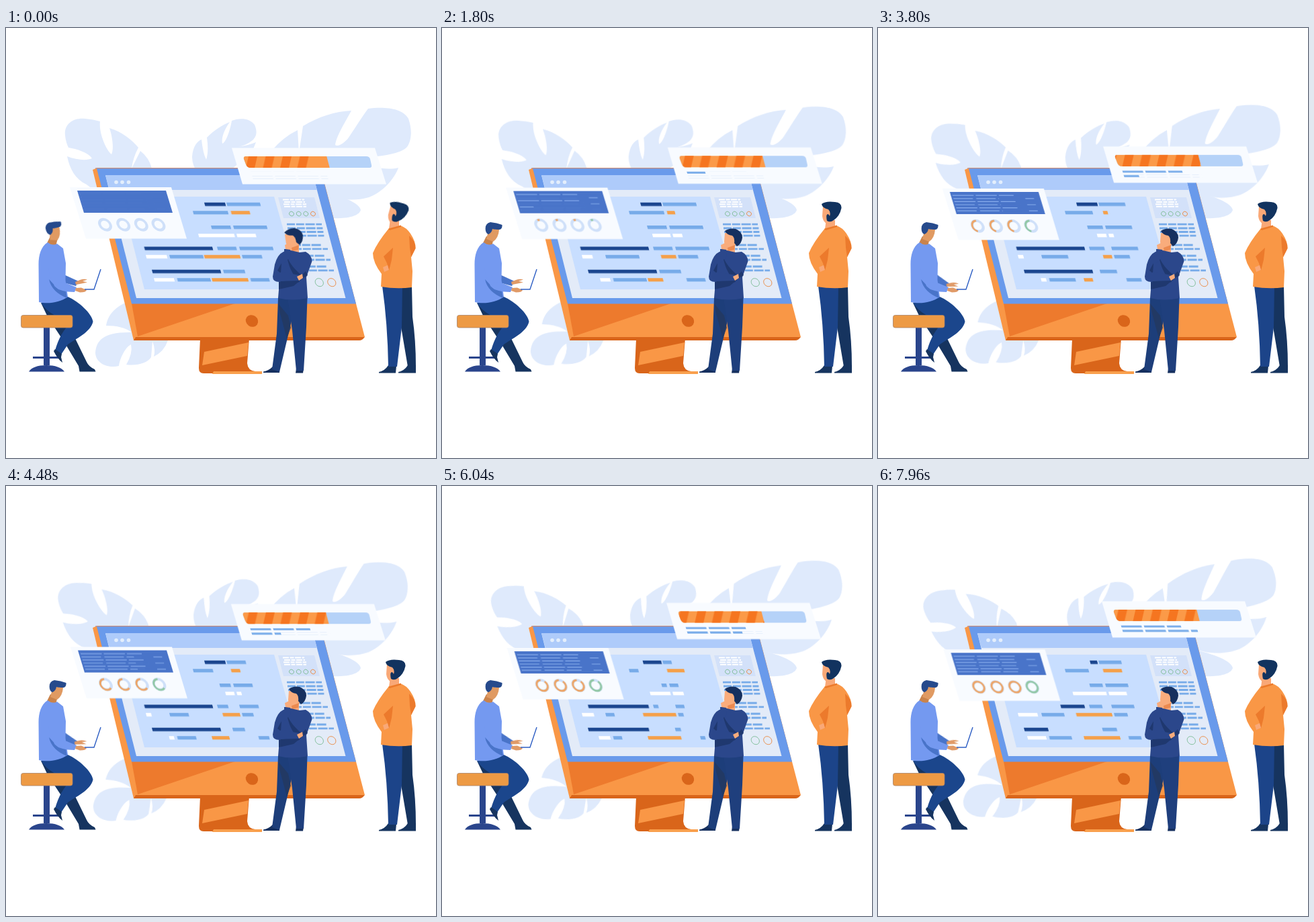
Animation, 640 px wide and 640 px high, one loop 8000 ms. Source, as an HTML page without scripts:

```html
<!DOCTYPE html>
<html lang="en">
<head>
<meta charset="utf-8">
<title>Team at the screen</title>
<style>
html, body { margin: 0; width: 100%; height: 100%; overflow: hidden; background: #fff; }
svg { display: block; width: 100vw; height: 100vh; }
.leaf { fill: #dfeafc; animation: turn 8s cubic-bezier(.4,.25,.75,.68) infinite; }
@keyframes turn { to { transform: rotate(var(--a)); } }
.pop { animation: drift 8s cubic-bezier(.42,.1,.8,.7) infinite; }
@keyframes drift { to { transform: translate(var(--x), var(--y)); } }

/* code bars */
.code rect { height: 5.2px; transform-box: fill-box; transform-origin: 0 0; animation: 8s linear infinite; }
.code .r { transform-origin: 100% 0; }
.code .b { fill: #77abe9; animation-name: blue; }
.code .o { fill: #f5a04a; animation-name: orange; }
.code .w { fill: #fff; animation-name: white; }
.code .d { fill: #1b468f; animation-name: dark; }
@keyframes blue {
  0%, 36% { transform: none; }
  47.5% { transform: scaleX(.79); }
  64.5% { transform: scaleX(.35); }
  79% { transform: scaleX(.24); }
  85.5% { transform: scaleX(.27); }
  100% { transform: scaleX(.69); }
}
@keyframes orange {
  0%, 80%, 100% { transform: none; }
  22.5% { transform: scaleX(.42); }
  33.5% { transform: scaleX(.29); }
  41%, 47.5% { transform: scaleX(.25); }
  64.5% { transform: scaleX(.72); }
}
@keyframes white {
  0% { transform: none; }
  22.5% { transform: scaleX(.5); }
  33.5% { transform: scaleX(.33); }
  47.5% { transform: scaleX(.26); }
  56% { transform: scaleX(.25); }
  64.5% { transform: scaleX(.32); }
  85.5% { transform: scaleX(.79); }
  100% { transform: scaleX(.94); }
}
@keyframes dark {
  0%, 70% { transform: none; }
  85.5% { transform: scaleX(.68); }
  100% { transform: scaleX(.34); }
}

/* covers shrink to the right and reveal the lines below them */
.hide rect { transform-box: fill-box; transform-origin: 100% 0; animation: 8s linear infinite; }
.hide .e0 { animation-name: e0; }
.hide .e1 { animation-name: e1; }
.hide .e2 { animation-name: e2; }
.hide .odd { animation-name: odd; }
.hide .s0 { animation-name: s0; }
.hide .s1 { animation-name: s1; }
.hide .s2 { animation-name: s2; }
@keyframes e0 { 0% { transform: none; } 9%, 100% { transform: scaleX(0); } }
@keyframes e1 { 0%, 9% { transform: none; } 18%, 100% { transform: scaleX(0); } }
@keyframes e2 { 0%, 18.5% { transform: none; } 22.5% { transform: scaleX(.79); } 32%, 100% { transform: scaleX(0); } }
@keyframes odd { 0%, 28% { transform: none; } 33.5% { transform: scaleX(.67); } 47.5% { transform: scaleX(.3); } 72%, 100% { transform: scaleX(0); } }
@keyframes s0 { 0%, 5% { transform: none; } 12%, 100% { transform: scaleX(0); } }
@keyframes s1 { 0%, 14% { transform: none; } 21%, 100% { transform: scaleX(0); } }
@keyframes s2 { 0%, 29% { transform: none; } 39%, 100% { transform: scaleX(0); } }
.hide .t0 { animation-name: t0; }
.hide .t1 { animation-name: t1; }
@keyframes t0 {
  0%, 14% { transform: none; }
  22.5% { transform: scaleX(.69); }
  33.5% { transform: scaleX(.3); }
  40%, 100% { transform: scaleX(0); }
}
@keyframes t1 {
  0%, 40% { transform: none; }
  47.5% { transform: scaleX(.8); }
  64.5% { transform: scaleX(.44); }
  85.5% { transform: scaleX(.155); }
  100% { transform: scaleX(.03); }
}

.ring { fill: none; stroke: #cfe0f9; stroke-width: 4; }
.arc { fill: none; stroke: #eda567; stroke-width: 2.8; stroke-dasharray: 100 200; animation: fill 8s linear infinite; }
.green { stroke: #92c8a5; }
@keyframes fill {
  0%, 16% { stroke-dashoffset: 100; }
  22.5% { stroke-dashoffset: 93; }
  33.5% { stroke-dashoffset: 77; }
  47.5% { stroke-dashoffset: 54; }
  64.5% { stroke-dashoffset: 19; }
  85.5% { stroke-dashoffset: 5; }
  100% { stroke-dashoffset: 0; }
}
.stripes { animation: slide 8s linear infinite; }
@keyframes slide { to { transform: translateX(230.5px); } }

.nod { animation: nod 8s infinite; }
@keyframes nod {
  0% { transform: rotate(var(--a)); animation-timing-function: ease-in-out; }
  20%, 100% { transform: none; }
}
.type { animation: type 8s ease-in-out infinite; transform-origin: 88px 373px; }
@keyframes type {
  0%, 22% { transform: none; }
  33.5% { transform: rotate(7deg); }
  47.5% { transform: rotate(11deg); }
  64.5%, 100% { transform: rotate(9deg); }
}
</style>
</head>
<body>
<svg viewBox="0 0 640 640">
<defs>
  <path id="o" pathLength="100" d="M0-8A8 8 0 0 0 0 8A8 8 0 0 0 0-8"/>
  <ellipse id="dot" cx="425" cy="276.500" rx="3.600" ry="3.200" transform="rotate(35 425 276.500)"/>
  <clipPath id="track"><path d="M357 191H536q5 0 6 4l2 9q1 4-3 4H364q-5 0-7-5l-3-8q-1-4 3-4z"/></clipPath>
  <clipPath id="done"><path d="M340 190H477L482 209H340z"/></clipPath>
</defs>

<!-- leaves -->
<path class="leaf" style="--a:-14deg;transform-origin:190px 251px" d="M88 160C86 143 100 133 118 135Q130 136 140 139C138 155 148 180 157 188C161 180 158 160 154 149C172 154 188 167 197 178Q189 193 187 209L200 183Q213 193 217 209L215 245L150 256L120 233C103 225 95 210 91 191C104 196 120 198 128 194C122 185 105 180 93 178Q89 170 88 160z"/>
<path class="leaf" style="--a:6.3deg;transform-origin:285px 232px" d="M277 192C278 176 285 168 291 166Q293 186 298 196Q302 184 299 163C310 152 322 144 333 140C326 150 320 162 322 172C328 170 334 150 336 138C346 134 362 133 370 144C375 156 372 162 367 167Q357 175 345 177Q360 175 372 170L366 185L330 215H285Q277 204 277 192z"/>
<path class="leaf" style="--a:-5deg;transform-origin:431px 270px" d="M396 182Q413 162 434 152L436 186L442 146C465 132 490 124 514 123C505 140 492 160 490 174C494 178 505 170 510 163C522 145 530 132 539 120C560 117 590 118 599 135C606 155 602 170 597 177C588 187 560 191 530 193L523 197C545 208 567 212 584 208C578 225 560 245 540 252C520 258 498 256 480 249L430 250z"/>
<path fill="#dfeafc" d="M468 243C500 250 526 260 528 271C525 281 505 284 484 283z"/>
<path class="leaf" style="--a:7.5deg;transform-origin:245px 430px" d="M149 443C152 425 165 414 180 408L250 425L241 465Q235 482 220 489Q223 480 218 466Q217 478 216 490C210 499 195 503 179 501Q189 484 186 471C178 475 170 490 168 503C153 507 134 500 133 484C134 465 145 452 187 453C178 446 165 443 149 443z"/>

<!-- stand -->
<path fill="#d9651a" d="M289 462H362L359 499Q360 510 371 511H381V514H294Q287 514 287 506z"/>
<path fill="#f99746" d="M295 482L361 468L359 488L292 502z"/>
<path fill="#f9a04d" d="M309 511H381V515H307z"/>

<!-- monitor -->
<path fill="#f99746" d="M129 211L136 208H468L534 460L190 465z"/>
<path fill="#d9651a" d="M193 460H534L533 461Q530 465 526 465H190z"/>
<path fill="#ed7a2d" d="M187 410H341L196 459z"/>
<path fill="#699aeb" d="M135 209H468L521 410.500H187z"/>
<path fill="#b98a8c" d="M133 208.200H468V209.200H133z"/>
<ellipse cx="366" cy="436" rx="9.500" ry="8.500" fill="#d9651a" transform="rotate(35 366 436)"/>
<path fill="#e3ebf8" d="M148 219H457L505.500 402H194z"/>
<path fill="#aecbfa" d="M148 219H457L462.800 241H154z"/>
<g fill="#e3eefc"><circle cx="164" cy="229.500" r="2.800"/><circle cx="173" cy="229.500" r="2.800"/><circle cx="182.500" cy="229.500" r="2.800"/></g>
<path fill="#c8deff" d="M171 251H399L438 389H206z"/>

<!-- side column -->
<path fill="#d3e1f9" d="M405 252H459L467 283H413z"/>
<g fill="none" stroke="#fff" stroke-width="2" stroke-dasharray="9 1.500 6 1.500">
  <path d="M412 255.500h32M414 259h31M413 262.300h34M414 265.700h33"/>
</g>
<g fill="none" stroke="#77abe9" stroke-width="2.800" stroke-dasharray="12 1.800 12 1.800 14 1.800 9 2">
  <path d="M418 292.200h52M419 298h53M420 303.500h54M421 309.200h54M427 323h42M428 328.800h51M432 339h42M433 345h50M435 355h43M437 360.800h51"/>
</g>
<g fill="none" stroke="#84bf9c" stroke-width=".9">
  <use href="#dot"/><use href="#dot" x="10.700"/><use href="#dot" x="21.300"/><use href="#dot" x="32" stroke="#ea8f4c"/>
  <ellipse cx="466.300" cy="378.700" rx="6.600" ry="5.500" transform="rotate(42 466.300 378.700)"/>
  <ellipse cx="484.800" cy="378.700" rx="6.600" ry="5.500" stroke="#ea8f4c" transform="rotate(42 484.800 378.700)"/>
</g>

<!-- code rows -->
<g class="code">
  <g transform="translate(0 259.800) skewX(14.500)"><rect class="d r" x="295" width="31"/><rect class="b" x="328" width="50"/></g>
  <g transform="translate(0 272.200) skewX(14.500)"><rect class="b" x="278" width="52"/><rect class="o" x="334.500" width="28"/></g>
  <g transform="translate(0 294) skewX(14.500)"><rect class="b r" x="305" width="29"/><rect class="b" x="338" width="50"/></g>
  <g transform="translate(0 306.200) skewX(14.500)"><rect class="w r" x="286" width="53.500"/><rect class="w" x="343" width="28.500"/></g>
  <g transform="translate(0 325.500) skewX(14.500)"><rect class="d r" x="205.500" width="101.500"/><rect class="b" x="314" width="28.500"/><rect class="b" x="347" width="50"/></g>
  <g transform="translate(0 337.800) skewX(14.500)"><rect class="w" x="208" width="31"/><rect class="b" x="243" width="50"/><rect class="o r" x="294.500" width="53.500"/><rect class="b" x="351" width="29.500"/></g>
  <g transform="translate(0 359.800) skewX(14.500)"><rect class="d" x="217" width="102"/><rect class="b r" x="323" width="32"/></g>
  <g transform="translate(0 372.200) skewX(14.500)"><rect class="w r" x="220" width="30"/><rect class="b" x="254.500" width="49.500"/><rect class="o" x="306" width="54"/><rect class="b r" x="363.500" width="28"/></g>
</g>

<!-- chart panel -->
<g class="pop" style="--x:2.500px;--y:6.300px">
  <path fill="#f8fbff" d="M95 237H246L269 313.500H119z"/>
  <path fill="#4974c9" d="M106 242H238L248 275H116z"/>
  <g transform="translate(110 247.200) skewX(17)">
    <g fill="none" stroke="#86abec" stroke-width="1.200">
      <path stroke-dasharray="31.500 3 31.500 3 22 50" d="M0 0H95M0 9.200H95M0 18.400H95"/>
      <path stroke-dasharray="29 5 29 4 22 50" d="M0 4.600H95M0 13.800H89M0 23H95"/>
      <path d="M107 4.600h13M107 13.800h13M107 23h13"/>
    </g>
    <g class="hide" fill="#4974c9">
      <rect class="e0" y="-1.500" width="97" height="3"/>
      <rect class="e1" y="7.700" width="97" height="3"/>
      <rect class="e2" y="16.900" width="97" height="3"/>
      <rect class="odd" y="3.100" width="97" height="3"/>
      <rect class="odd" y="12.300" width="97" height="3"/>
      <rect class="odd" y="21.500" width="97" height="3"/>
      <rect class="s0" x="106" y="3.100" width="15" height="3"/>
      <rect class="s1" x="106" y="12.300" width="15" height="3"/>
      <rect class="s2" x="106" y="21.500" width="15" height="3"/>
    </g>
  </g>
  <g transform="translate(147.500 292.800) skewX(17)"><use href="#o" class="ring"/><use href="#o" class="arc"/></g>
  <g transform="translate(174.700 292.800) skewX(17)"><use href="#o" class="ring"/><use href="#o" class="arc"/></g>
  <g transform="translate(201.300 292.800) skewX(17)"><use href="#o" class="ring"/><use href="#o" class="arc"/></g>
  <g transform="translate(227 292.800) skewX(17)"><use href="#o" class="ring"/><use href="#o" class="arc green"/></g>
</g>

<!-- progress panel -->
<g class="pop" style="--x:-3px;--y:-7px">
  <path fill="#f8fbff" d="M336 178.500H549L566 232.500H352z"/>
  <g clip-path="url(#track)">
    <path fill="#b5d2f8" d="M350 190H550V209H350z"/>
    <g clip-path="url(#done)">
      <path fill="#fb9a48" d="M340 190H490V209H340z"/>
      <g class="stripes"><path fill="none" stroke="#f57520" stroke-width="19" stroke-dasharray="13 12.500" transform="translate(0 199.500) skewX(-13)" d="M448.500 0H90"/></g>
    </g>
  </g>
  <g transform="translate(365 216) skewX(17)">
    <path fill="none" stroke="#77abe9" stroke-width="3" stroke-dasharray="30.500 3.500" d="M0 0H89M0 6.500H112"/>
    <g class="hide" fill="#f8fbff"><rect class="t0" y="-2" x="-1" width="91" height="4"/><rect class="t1" y="4.500" x="-1" width="117" height="4"/></g>
  </g>
</g>

<!-- seated man -->
<path fill="#2a458c" d="M56 445H65V502H56zM40 489H80V492H40zM34 511.500Q40 502 60 502T87 511.500z"/>
<path fill="#16345f" d="M52 409L75 424L101 434L101 458L120 497Q123 504 132 508L133.500 511.500H109.500L108 503L87 468L62 430z"/>
<path fill="#1b468c" d="M56 408L92 400C108 407 128 425 129.500 437C126 453 103 463 92 471L82 486L73 480C78 462 86 448 97 438C80 432 62 425 52 409z"/>
<path fill="#16345f" d="M73 478L83 485L82 490L84 498Q77 493 71 481z"/>
<rect x="22.500" y="427.500" width="76.500" height="18.500" rx="3" fill="#ed9a44" stroke="#a98267" stroke-width=".8"/>
<g class="type">
  <path fill="#4974c9" d="M84 366L108 377L104 384L86 379z"/>
  <path fill="#e09a67" d="M103 378L110 375Q116 373 121 374.500L114 376.800L121 378.500L112 380.500L104 382z"/>
</g>
<path fill="#c9834c" d="M66 310L77 313L74 325L61 320z"/>
<path fill="#7499f0" d="M62 319C52 325 48.500 338 48.500 352L49 408C62 411 80 409 92 400L88.500 375L89 350L85 328L76 321Q69 325 62 319z"/>
<path fill="#4974c9" d="M64 374Q68 393 91 402L89 391L78 389z"/>
<path fill="#7499f0" d="M62 355L67 377L88 379L105 386L102 393Q80 393 72 384z"/>
<path fill="#e09a67" d="M104 387L112 386.500L120 390Q119 393.500 110 393.500L103 391z"/>
<path fill="none" stroke="#2f5fc4" stroke-width="1.400" d="M141 359L131 389H117"/>
<g class="nod" style="--a:-18deg;transform-origin:70px 316px">
  <path fill="#e09a62" d="M70 298L85 300Q84 313 76 318L66 314z"/>
  <path fill="#264a8c" d="M65 302Q63 291 72 289Q82 290 89.500 293Q90 299 86 300Q78 300 75 299Q74 305 69 307Q66 306 65 302z"/>
</g>

<!-- thinking man -->
<path fill="#16305f" d="M397 504L407 507V513H383V511.500Q391 510 397 504zM432 507H443L442 513.500H431z"/>
<path fill="#1d3e7a" d="M405 402H428L424 440L407 512L396 508L403 455z"/>
<path fill="#1f3f7d" d="M419 402H448.500L447 445L443 510H432L426 450z"/>
<path fill="#233960" d="M405 410L420 428L424 446L418 462L408 425z" opacity=".8"/>
<path fill="#f7aa7c" d="M423 320H436V337H423z"/>
<g class="nod" style="--a:-13deg;transform-origin:428px 333px">
  <path fill="#f9ac7c" d="M421 305L436 306L439 322L430 328Q420 328 420 318z"/>
  <path fill="#16305f" d="M421 302Q428 297 437 299Q447 303 447 312Q446 321 439 325L435 320Q436 312 432 309Q424 308 421 302z"/>
</g>
<path fill="#ec8a50" d="M425 327L436 323L435 330L426 332z"/>
<path fill="#2b478b" d="M413 333L424 331L437 334L446 333Q455 338 455.500 347L447 371L449 402Q426 407 405 402L407 378Q397 378 397 370L400 352Q404 337 413 333z"/>
<path fill="#1f386f" d="M417 332Q418 350 440 368L446 362L449 368L441 373L409 377L406 386L437 378Q420 362 417 332zM410 350L404 361L409 365z"/>
<path fill="#1f386f" d="M406 378L440 374L428 384L406 389z"/>
<path fill="#2b478b" d="M398 369Q398 376 404 377L435 376L437 368L410 363z"/>
<path fill="#2b478b" d="M414 329L423 329L424 340L414 350z"/>
<path fill="#f9ac7c" d="M415 323L421 320L425 325L423 330L416 329zM433 370L441 366L442 372L436 376z"/>

<!-- standing man -->
<path fill="#16345f" d="M569 502L581 503L580 513.500H555V512Q564 510 569 502zM598 502H610V513.500H584V512Q593 510 598 502z"/>
<path fill="#16345f" d="M586 384H604L605 430Q610 465 610 504H598L588 445z"/>
<path fill="#1c4489" d="M560 384H590L589 445L582 504H569Q568 440 560 384z"/>
<path fill="#f9a877" d="M572 284L585 286V297L570 299z"/>
<path fill="#f99746" d="M570 298L587 294Q596 297 602 306Q610 318 609.500 328L603 341L605 362L604 386Q582 389 558 385L559 366Q546 349 546 335Q552 320 570 298z"/>
<path fill="#ec7a2c" d="M600 309Q610 318 609.500 328L603 341L601 327zM576 327L562 340L567 350L570 361L574 345zM569 299L588 293.500V296L571 301z"/>
<path fill="#f9a877" d="M561 356L568 353L570 360L563 363z"/>
<g class="nod" style="--a:11deg;transform-origin:577px 294px">
  <path fill="#f9a877" d="M567 265L579 266L582 286L573 291Q567 289 566 280z"/>
  <path fill="#12335f" d="M565 262Q571 257 585 259Q595 260 594.500 268Q592 280 583 286Q578 290 573 287Q571 278 574 277Q576 277 577 280Q579 274 575 270Q566 268 565 262z"/>
</g>
</svg>
</body>
</html>
```
